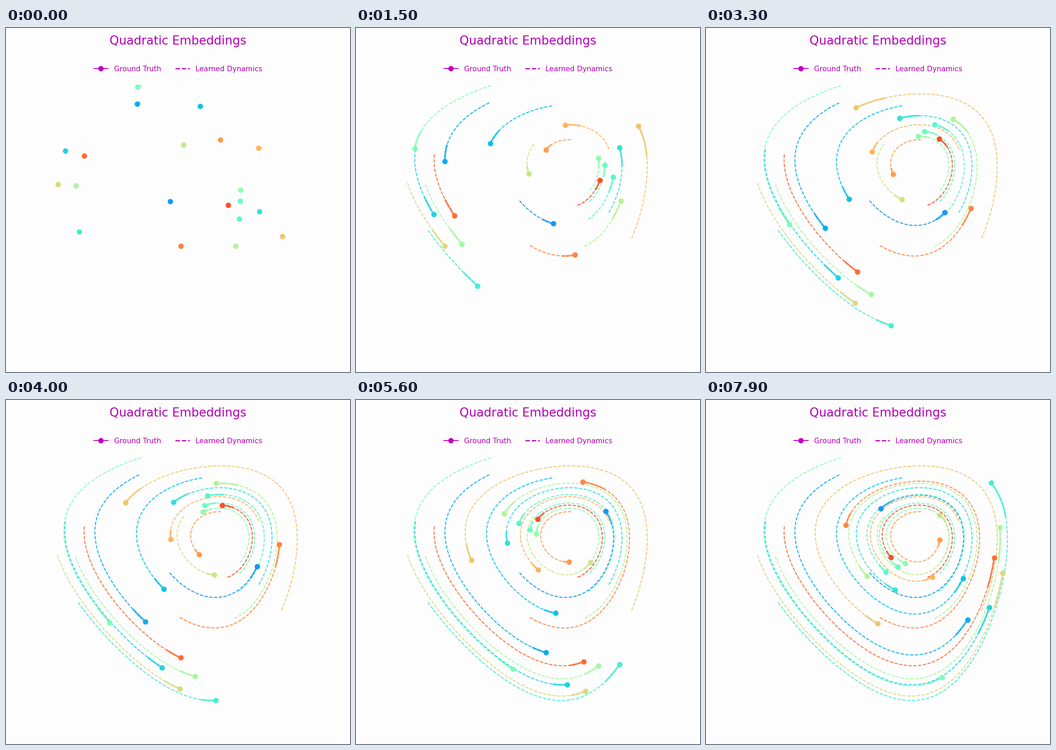
These frames come from a looping animation (748x748 px, 8000 ms). A matplotlib script:

```python
import numpy as np
import matplotlib.pyplot as plt
from matplotlib.animation import FuncAnimation
from matplotlib.lines import Line2D

SIZE, DPI = 748, 93.5
FRAMES, SUB = 80, 3       # integration steps per displayed frame
H = 0.1 / SUB
TAIL = 4 * SUB            # steps kept in the solid trail
PURPLE, INK = "#bf00bf", "#b400b4"

# Starting points in pixels, from the blue to the red particle
START = np.array([
    (357, 377), (285, 165), (422, 170), (129, 267), (551, 399),
    (159, 443), (507, 415), (509, 376), (286, 128), (510, 352),
    (152, 343), (499, 474), (386, 254), (113, 340), (601, 453),
    (549, 261), (466, 243), (380, 474), (170, 278), (483, 385)], float).T

# Where a few particles pass after 3.3 s and 7.9 s
KEYS = {1: ((258, 435), (569, 479)), 5: ((402, 646), (619, 181)),
        8: ((182, 427), (514, 603)), 14: ((326, 173), (373, 486)),
        16: ((407, 318), (508, 303)), 17: ((576, 392), (304, 272))}
KEY_STEPS = [round(3.3 / H), round(7.9 / H)]

# Centre, scale, coupling rates, damping rates
GUESS = np.array([450, 296, 200, 150, 0.45, 0.77, 0.02, 0.02, 0, 0])
SPAN = np.array([100, 100, 200, 150] + [0.5] * 6)


def flow(p, q):
    """Damped Lotka-Volterra flow in log coordinates."""
    cx, cy, sx, sy, a, c, d1, k1, d2, k2 = p
    u = np.clip((q[0] - cx) / sx, -5, 5)
    v = np.clip((cy - q[1]) / sy, -5, 5)
    eu, ev = np.expm1(u), np.expm1(v)
    du = -a * ev - d1 * eu - d2 * u
    dv = c * eu - k1 * ev - k2 * v
    return np.stack([sx * du, -sy * dv])


def rk4(p, q, h):
    a = flow(p, q)
    b = flow(p, q + h / 2 * a)
    c = flow(p, q + h / 2 * b)
    d = flow(p, q + h * c)
    return q + h / 6 * (a + 2 * b + 2 * c + d)


def integrate(z, start):
    """Paths for every column of scaled parameters: (step, xy, column, particle)."""
    p = (GUESS[:, None] + SPAN[:, None] * z)[:, :, None]
    q = np.repeat(start[:, None, :], z.shape[1], axis=1)
    out = [q]
    for _ in range(KEY_STEPS[-1]):
        q = rk4(p, q, H)
        out.append(q)
    before = rk4(p, out[0], -H)
    return np.array([before] + out)


def calibrate(rounds=30, eps=1e-4):
    """Levenberg-Marquardt fit of the flow to the key points."""
    start = START[:, list(KEYS)]
    goal = np.array(list(KEYS.values()), float).transpose(1, 2, 0).ravel()

    def passes(z):
        picked = integrate(z, start)[[1 + s for s in KEY_STEPS]]
        return np.moveaxis(picked, 2, 0).reshape(z.shape[1], -1)

    n = len(GUESS)
    z, lam = np.zeros(n), 1e-2
    probe = eps * np.hstack([np.zeros((n, 1)), np.eye(n)])
    for _ in range(rounds):
        out = passes(z[:, None] + probe)
        r = goal - out[0]
        jac = (out[1:] - out[0]) / eps
        normal = jac @ jac.T
        damp = np.diag(lam * np.diag(normal) + 1e-9)
        step = np.linalg.solve(normal + damp, jac @ r)
        miss = goal - passes((z + step)[:, None])[0]
        if miss @ miss < r @ r:
            z, lam = z + step, max(lam / 4, 1e-6)
        else:
            lam *= 6
    return z


paths = integrate(calibrate()[:, None], START)[:, :, 0]
colors = plt.cm.rainbow(np.linspace(0.2, 0.9, START.shape[1]))

fig = plt.figure(figsize=(SIZE / DPI, SIZE / DPI), dpi=DPI, facecolor="#fdfdfd")
ax = fig.add_axes([0, 0, 1, 1])
ax.set_xlim(0, SIZE)
ax.set_ylim(SIZE, 0)
ax.axis("off")

ax.text(SIZE / 2, 36, "Quadratic Embeddings", fontsize=20, color=INK,
        ha="center", va="baseline", family="DejaVu Sans")
ax.legend(
    handles=[
        Line2D([], [], color=PURPLE, lw=1.5, marker="o", ms=8, label="Ground Truth"),
        Line2D([], [], color=PURPLE, lw=2, ls="--", label="Learned Dynamics"),
    ],
    loc="center", bbox_to_anchor=(0.5, 1 - 89.1 / SIZE), ncol=2, frameon=False,
    labelcolor=INK, prop={"family": "DejaVu Sans", "size": 12})

tails, dashes, dots = [], [], []
for col in colors:
    tails += ax.plot([], [], color=col, lw=3, alpha=0.75, zorder=2)
    dashes += ax.plot([], [], color=col, lw=1.5, ls="--", zorder=3)
    dots += ax.plot([], [], color=col, marker="o", ms=8, ls="", zorder=4)


def update(i):
    now = 1 + SUB * i
    for k in range(len(dots)):
        x, y = paths[:now + 1, :, k].T
        dashes[k].set_data(x, y)
        tails[k].set_data(x[-TAIL - 1:], y[-TAIL - 1:])
        dots[k].set_data(x[-1:], y[-1:])
    return tails + dashes + dots


anim = FuncAnimation(fig, update, frames=FRAMES, interval=100, repeat=True)
plt.show()
```
